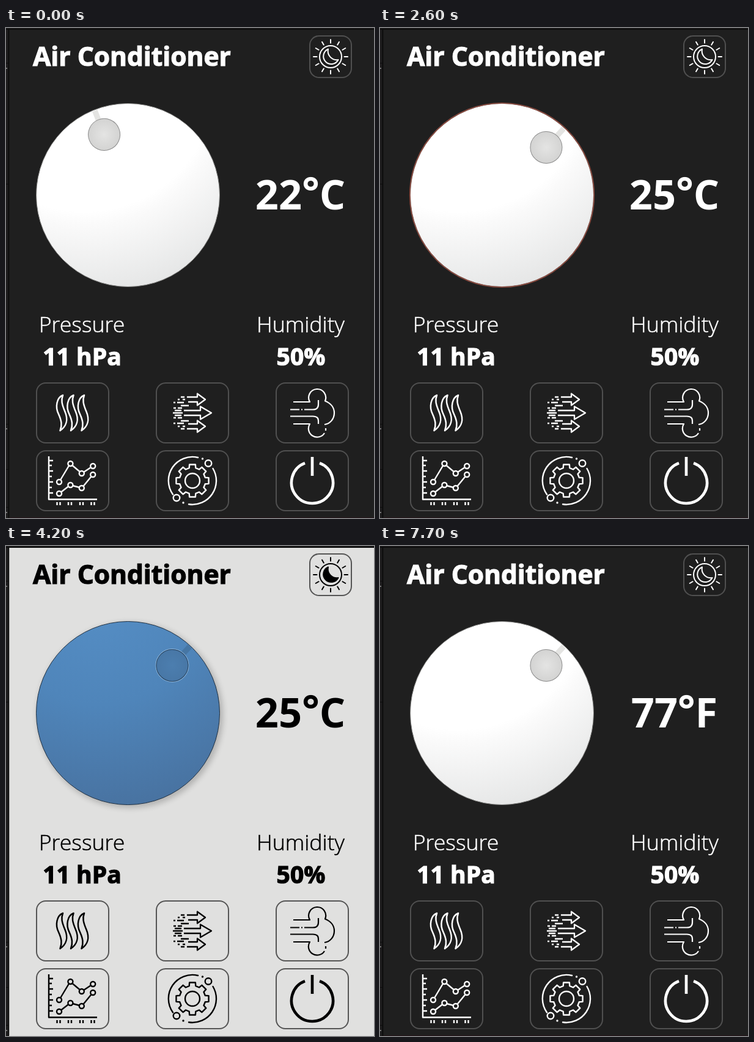
Recreate the animation shown at these times as an HTML page. Size 602 by 802 pixels, loop 8 s.

```html
<!DOCTYPE html>
<html lang="en">
<head>
<meta charset="utf-8">
<title>Air Conditioner</title>
<style>
  html, body { margin: 0; width: 100%; height: 100%; overflow: hidden; background: #1f1f1f; }
  svg { display: block; width: 602px; height: 802px; }
  svg {
    --bg: #1f1f1f; --ink: #fff; --edge: #505050; --face: url(#whiteFace); --knob: url(#greyKnob);
    --notch: #e4e4e2; --knobEdge: #8c8c8c; --halo: none; --moon: none; --rim: #80807e; --shade: 0;
    --foot: #241319;
  }
  svg.light {
    --bg: #e0e0df; --ink: #000; --edge: #555; --face: url(#blueFace); --knob: url(#blueKnob);
    --notch: #4676a4; --knobEdge: #25405c; --halo: #8fb6da; --moon: #000; --rim: #1f3042; --shade: .2;
    --foot: #e0e0df;
  }
  .page { fill: var(--bg); }
  text { fill: var(--ink); stroke: var(--ink); stroke-width: 0; font-family: "Noto Sans", "Open Sans", sans-serif; font-weight: 700; }
  .mid { text-anchor: middle; }
  .label { font: 300 35.7px "Open Sans", "Noto Sans", sans-serif; stroke-width: .5; }
  .title { font-size: 42.5px; stroke-width: 1.2; }
  .value { font-size: 39px; stroke-width: 1.2; }
  .box { fill: none; stroke: var(--edge); stroke-width: 2; }
  .icon { fill: none; stroke: var(--ink); stroke-width: 2.5; stroke-linejoin: round; stroke-linecap: round; }
  .flat { stroke-linecap: butt; }
  .dot { fill: var(--ink); stroke: none; }
  .node { fill: var(--bg); }
</style>
</head>
<body>
<svg id="stage" viewBox="0 0 602 802">
  <defs>
    <radialGradient id="whiteFace" gradientUnits="userSpaceOnUse" cx="128" cy="85" r="365">
      <stop offset=".59" stop-color="#fff"/>
      <stop offset=".65" stop-color="#fafafa"/>
      <stop offset="1" stop-color="#e3e4e4"/>
    </radialGradient>
    <radialGradient id="blueFace" gradientUnits="userSpaceOnUse" cx="150" cy="85" r="350">
      <stop offset="0" stop-color="#558ec5"/>
      <stop offset=".5" stop-color="#4f85ba"/>
      <stop offset="1" stop-color="#4872a0"/>
    </radialGradient>
    <radialGradient id="greyKnob">
      <stop offset="0" stop-color="#e4e4e3"/>
      <stop offset="1" stop-color="#d3d3d2"/>
    </radialGradient>
    <radialGradient id="blueKnob">
      <stop offset="0" stop-color="#4c7eaf"/>
      <stop offset="1" stop-color="#4877a6"/>
    </radialGradient>
    <filter id="blur" x="-20%" y="-20%" width="140%" height="140%"><feGaussianBlur stdDeviation="5"/></filter>
    <path id="flame" d="M93 601C83 605 80 620 86 632C91 643 92 650 88.500 659C99 652 102 641 96.500 628C91 615 90 609 93 601Z"/>
    <path id="ray" d="M531 24.500V19"/>
  </defs>

  <rect width="602" height="802" fill="#1d1c1d"/>
  <rect class="page" x="5" y="3" width="597" height="799"/>
  <path d="M0 2H602M4.500 2V802" fill="none" stroke="#080808" stroke-width="1.500"/>
  <path d="M0 57.500H4M0 255.500H4M0 648.500H4M0 722.500H4M0 784.500H4" stroke="#0c0c0c"/>
  <path d="M0 66H2M0 656H2M0 793H2" stroke="#777" stroke-width="2"/>
  <path d="M5 801.500H602" style="stroke:var(--foot)"/>

  <text class="title" x="44" y="62">Air Conditioner</text>

  <g id="themeButton">
    <rect class="box" x="497" y="13" width="68" height="68" rx="15"/>
    <g class="icon" style="stroke-width:2">
      <circle cx="531" cy="47" r="18"/>
      <path d="M527 34.500A12.800 12.800 0 1 0 543.500 52A14.500 14.500 0 0 1 527 34.500Z" style="fill:var(--moon)"/>
      <g id="rays"></g>
    </g>
  </g>

  <circle cx="203" cy="277" r="152" filter="url(#blur)" style="opacity:var(--shade)"/>
  <circle cx="199.500" cy="273.500" r="150" style="fill:var(--face);stroke:var(--rim)"/>
  <circle id="focusRing" cx="199.500" cy="273.500" r="150.700" fill="none" stroke="#8b4b40" stroke-width="1.800"/>
  <g id="pointer">
    <path d="M199.500 148V125" style="stroke:var(--notch)" stroke-width="9"/>
    <circle cx="199.500" cy="167" r="27" style="fill:none;stroke:var(--halo)"/>
    <circle cx="199.500" cy="167" r="26" style="fill:var(--knob);stroke:var(--knobEdge)"/>
  </g>
  <text class="mid" x="481.500" y="297" font-size="66.667"><tspan id="number">22</tspan><tspan id="degree" dy="-5">°</tspan><tspan id="unit" dy="5">C</tspan></text>

  <text class="mid label" x="124" y="498">Pressure</text>
  <text class="mid value" x="124.500" y="552">11 hPa</text>
  <text class="mid label" x="482" y="498">Humidity</text>
  <text class="mid value" x="482.500" y="552">50%</text>

  <g id="boxes"></g>

  <g class="icon">
    <use href="#flame"/><use href="#flame" x="17.500"/><use href="#flame" x="35"/>
  </g>

  <g class="icon flat" style="stroke-width:2.3">
    <path d="M296 604H313V598.500L326 608L313 617.500V612H298"/>
    <path d="M291 626H318V619.500L336 630L318 640.500V634H291"/>
    <path d="M298 648H313V642.500L326 652L313 661.500V656H296"/>
    <path d="M286 604H292M281 608H284M289 608H293M274 613H277M280 613H291M286 618H299M274 622H278M281 622H288M276 626H287M273 630H289M276 634H287M274 638H278M281 638H288M286 643H299M274 647H277M280 647H291M281 652H284M289 652H293M286 656H292"/>
  </g>

  <g class="icon flat" style="stroke-width:2.2">
    <path d="M470 612H497A14 14 0 1 1 522 610.500C531 614 537 621 537 630C537 640 530 648 521 649"/>
    <path d="M470 648H497A13.500 13.500 0 1 0 521 663M523 659V655"/>
    <path d="M465 624.500H480M483 624.500H485M488 624.500H502Q511 624.500 511 616V609"/>
    <path d="M465 635.500H502Q511 635.500 511 643V648"/>
  </g>

  <g class="icon flat" style="stroke-width:2.4">
    <path d="M70 701V771.500H149"/>
    <path d="M70 708H77M70 716H75M70 725H77M70 734H75M70 743H77M70 752H75M70 761H77"/>
    <path d="M83.500 776V781M88.500 776V781M102 776V781M107 776V781M121 776V781M126 776V781M139.500 776V781M144.500 776V781"/>
    <path d="M87 743L105 713L124 729L142 717M87 762L105 748L124 753L142 731"/>
    <g id="nodes"></g>
  </g>

  <g class="icon" style="stroke-width:2.4">
    <path id="gear"/>
    <circle cx="305" cy="741" r="12"/>
    <path d="M314 703A39 39 0 0 0 273 763.500M338.500 721A39 39 0 0 1 299 779.500"/>
    <circle cx="331" cy="712.500" r="5.300"/>
    <circle cx="279" cy="769" r="5.300"/>
    <circle class="dot" cx="321.500" cy="705" r="1.700"/>
    <circle class="dot" cx="290" cy="777" r="1.700"/>
  </g>

  <g class="icon flat" style="stroke-width:4.6">
    <path d="M489 712.200A34 34 0 1 0 513 712.200M501 702V733"/>
  </g>
</svg>

<script>
  const LOOP = 8000;
  const $ = id => document.getElementById(id);
  const repeat = (n, fn) => Array.from({ length: n }, (_, i) => fn(i)).join("");

  $("rays").innerHTML = repeat(12, i => `<use href="#ray" transform="rotate(${i * 30} 531 47)"/>`);
  $("boxes").innerHTML = repeat(6, i =>
    `<rect class="box" x="${50 + i % 3 * 196}" y="${i < 3 ? 581 : 692}" width="118" height="98" rx="15"/>`);
  $("nodes").innerHTML = [[743, 762], [713, 748], [729, 753], [717, 731]].flatMap((ys, i) =>
    ys.map(y => `<circle class="node" cx="${87 + i * 18.4}" cy="${y}" r="4"/>`)).join("");

  // Eight teeth: two inner and two outer corners each.
  $("gear").setAttribute("d", "M" + repeat(8, i =>
    [[-.25, 21.5], [-.18, 27], [.18, 27], [.25, 21.5]].map(([offset, r]) => {
      const a = i * Math.PI / 4 + offset;
      return `${(305 + r * Math.sin(a)).toFixed(2)} ${(741 - r * Math.cos(a)).toFixed(2)} `;
    }).join("")) + "Z");

  const stepsSince = (t, start) => Math.floor((t - start) / 100);

  function temperature(t) {
    if (t < 500) return 22;
    if (t < 800) return 23;
    if (t < 1600) return Math.min(30, 24 + stepsSince(t, 800));
    if (t < 1800) return 16;
    return Math.min(25, 17 + stepsSince(t, 1800));
  }

  function reading(t) {
    if (t >= 7700) return [77, "°", "F"];
    if (t >= 6800) return [298, "", "K"];
    return [temperature(t), "°", "C"];
  }

  function buttonDrop(t) {
    const drops = [[3900, 1], [4000, 4], [4100, 2], [4200, 0], [5200, 1], [5300, 4], [5500, 2], [5600, 0]];
    return drops.reduce((y, [start, drop]) => t >= start ? drop : y, 0);
  }

  function draw(t) {
    const angle = -150 + (temperature(t) - 16) * 300 / 14;
    $("pointer").setAttribute("transform", `rotate(${angle} 199.5 273.5)`);
    $("focusRing").style.opacity = t >= 500 && t < 3600 ? 1 : 0;
    $("themeButton").setAttribute("transform", `translate(0 ${buttonDrop(t)})`);
    $("stage").classList.toggle("light", t >= 3900 && t < 5200);

    const [number, degree, unit] = reading(t);
    $("number").textContent = number;
    $("degree").textContent = degree;
    $("unit").textContent = unit;
    // An empty degree sign raises nothing, so the unit needs no drop back.
    $("unit").setAttribute("dy", degree ? 5 : 0);
  }

  const start = performance.now();
  function tick() {
    draw((performance.now() - start) % LOOP);
    requestAnimationFrame(tick);
  }
  tick();
</script>
</body>
</html>
```
